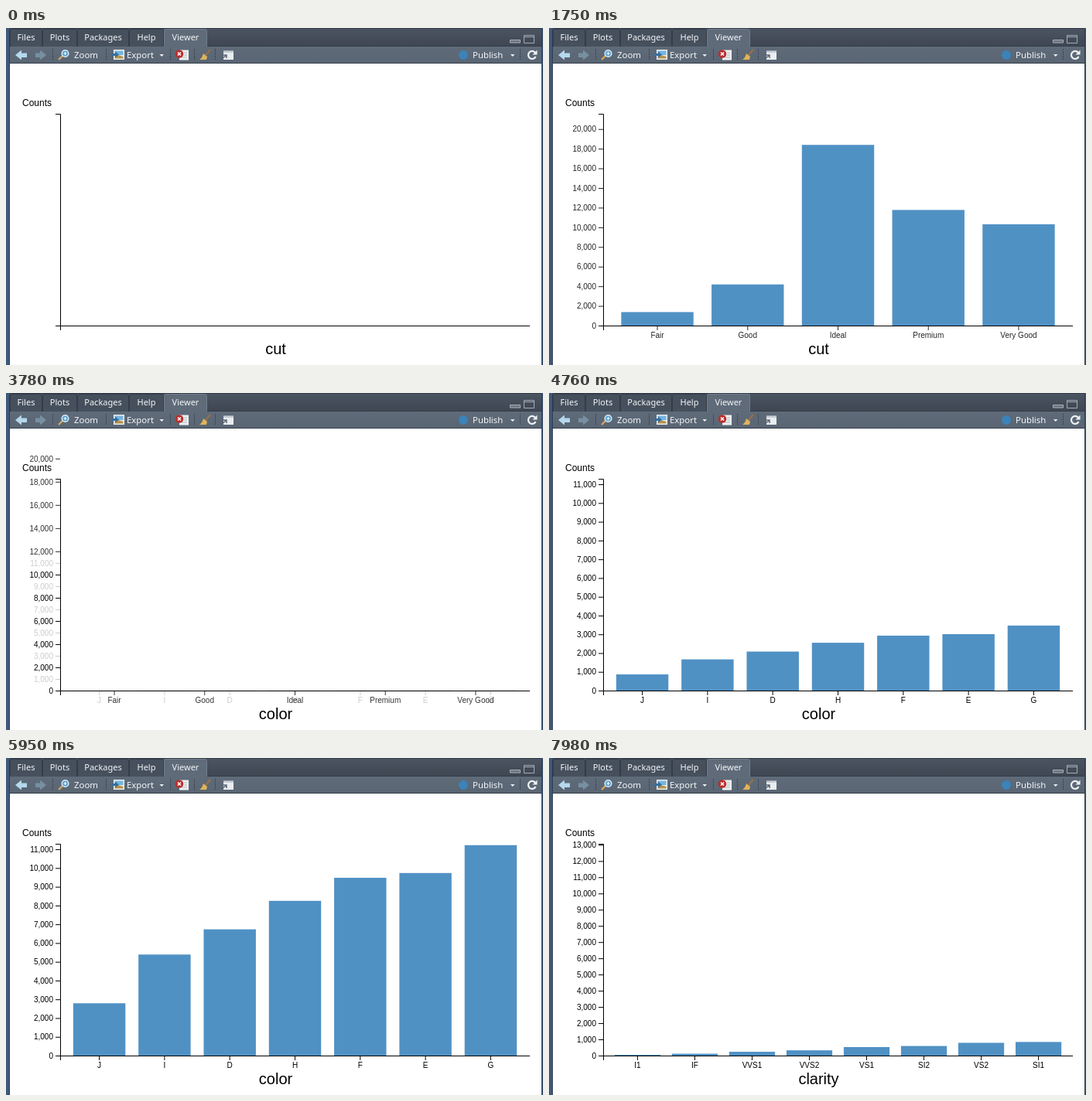
Recreate the animation shown at these times as an HTML page. Size 694x436 px, loop 8 s.

```html
<!DOCTYPE html>
<html lang="en">
<head>
<meta charset="utf-8">
<title>Bar chart viewer</title>
<style>
  html, body { margin: 0; width: 100%; height: 100%; overflow: hidden; background: #fff; }
  svg { display: block; }
  .ui { font: 11px "Noto Sans", "Open Sans", sans-serif; fill: #f4f6f8; }
  .ui .tool { font-size: 11.4px; }
  .chart { font: 10px "Liberation Sans", Arial, sans-serif; }
  .axis { fill: none; stroke: #000; }
  .bar { fill: #5091c4; }
</style>
</head>
<body>
<svg width="694" height="436" viewBox="0 0 694 436">
  <defs>
    <linearGradient id="tabBar" x2="0" y2="1">
      <stop stop-color="#4b5461"/><stop offset="1" stop-color="#3e4652"/>
    </linearGradient>
    <linearGradient id="toolBar" x2="0" y2="1">
      <stop stop-color="#5f6b79"/><stop offset="1" stop-color="#596573"/>
    </linearGradient>
  </defs>

  <!-- Window frame -->
  <rect width="694" height="436" fill="#40597a"/>
  <path d="M4.5 1V436M692.5 1V436" stroke="#2d3c4e"/>
  <rect x="5" y="46" width="687" height="390" fill="#fff"/>
  <rect x="5" y="1" width="687" height="23" fill="url(#tabBar)"/>
  <rect x="5" y="24" width="687" height="21.5" fill="url(#toolBar)"/>
  <path d="M5 .5H692M5 45.5H692" stroke="#343d49"/>
  <path d="M5 23.5H204M260 23.5H692" stroke="#353d48"/>
  <g class="ui">
    <g id="tabs"></g>
    <g class="tool">
      <text x="88" y="39">Zoom</text>
      <text x="156" y="39">Export</text>
      <text x="603" y="39">Publish</text>
    </g>
  </g>
  <path d="M60.5 27V42M129.5 27V42M212.5 27V42M243.5 27V42M270.5 27V42M664.5 27V42"
        stroke="#3b4550" stroke-dasharray="2 1"/>

  <!-- Toolbar icons -->
  <path d="M12 35L20 28.5V32.5H27V38H20V41.5Z" fill="#b5d8ed"/>
  <path d="M52 35L44 28.5V32.5H38V38H44V41.5Z" fill="#788fa1"/>
  <path d="M68 41L73 36" stroke="#d4a35e" stroke-width="2.4"/>
  <circle cx="76.5" cy="33" r="4.3" fill="#5ba2cf" stroke="#d9eaf4" stroke-width="1.5"/>
  <path d="M74.5 33H78.5M76.5 31V35" stroke="#fff"/>
  <path d="M139 28H153V41H139Z" fill="#e9eef0"/>
  <path d="M140.5 29.5H151.5V35H140.5Z" fill="#74b5df"/>
  <path d="M140.5 39.5V37L145 35L151.5 37V39.5Z" fill="#b79249"/>
  <path d="M136 33H141V30.5L146 34.5L141 38.5V36H136Z" fill="#366f9f"/>
  <path d="M198.5 34H204L201.2 37ZM652 34H657.5L654.7 37Z" fill="#edf1f4"/>
  <path d="M224 28.5H236V41.5H224Z" fill="#eef0f1"/>
  <path d="M230 32H234M230 35H234M227 38H234" stroke="#aeb6bd"/>
  <circle cx="224" cy="33.5" r="5.3" fill="#b92f2c"/>
  <path d="M222 31.5L226 35.5M226 31.5L222 35.5" stroke="#fff" stroke-width="1.6"/>
  <path d="M264 28L258 35" stroke="#9b7048" stroke-width="2"/>
  <path d="M255 33L260 37L259 41H250Q254 38 255 33Z" fill="#dfb45b"/>
  <path d="M281 29.5H294V41H281Z" fill="#e9edf0"/>
  <path d="M281 31H294" stroke="#a4afb9"/>
  <path d="M279 40L284 36M281 35H285V39" fill="none" stroke="#596573" stroke-width="1.5"/>
  <circle cx="591" cy="35" r="6" fill="#3b83b9"/>
  <path d="M684 32A5 5 0 1 0 684.5 37" fill="none" stroke="#eef1f3" stroke-width="2.2"/>
  <path d="M686.5 28.5V34.5H680.5Z" fill="#eef1f3"/>
  <path d="M651.5 15.5H664.5V19H651.5Z" fill="#69737f" stroke="#aab1b9"/>
  <path d="M669.5 9.5H682.5V19.5H669.5ZM669.5 11.5H682.5" fill="none" stroke="#a3abb4"/>

  <g class="chart">
    <text x="21" y="101" font-size="12">Counts</text>
    <g id="plot"></g>
    <path class="axis" d="M64 111.5H70.5V385.5H64M70.5 391V385.5H677"/>
    <text id="title" x="348.5" y="422" font-size="20" text-anchor="middle"></text>
  </g>
</svg>
<script>
const LOOP = 8000, BAR_TIME = 2600;
const LEFT = 70, BASE = 385, WIDTH = 607, HEIGHT = 274;

const charts = [
  { title: 'cut', start: 15, axisTime: BAR_TIME, tickStep: 2000,
    data: { Fair: 1610, Good: 4906, Ideal: 21551, Premium: 13791, 'Very Good': 12082 } },
  { title: 'color', start: 3656, axisTime: 340, tickStep: 1000,
    data: { J: 2808, I: 5422, D: 6775, H: 8304, F: 9542, E: 9797, G: 11292 } },
  { title: 'clarity', start: 7325, axisTime: 340, tickStep: 1000,
    data: { I1: 741, IF: 1790, VVS1: 3655, VVS2: 5066, VS1: 8171, SI2: 9194, VS2: 12258, SI1: 13065 } }
];

for (const chart of charts) {
  const entries = Object.entries(chart.data);
  const step = WIDTH / (entries.length + 0.2);
  chart.max = Math.max(...Object.values(chart.data));
  chart.band = step * 0.8;
  chart.bars = entries.map(([label, value], i) => ({ label, value, x: LEFT + step * (i + 0.2) }));
  chart.ticks = [];
  for (let v = 0; v <= chart.max; v += chart.tickStep) chart.ticks.push(v);
}

const plot = document.getElementById('plot');
const title = document.getElementById('title');

document.getElementById('tabs').innerHTML =
  [['Files', 6, 40], ['Plots', 48, 43], ['Packages', 93, 65], ['Help', 160, 43], ['Viewer', 205, 54]]
    .map(([name, x, width]) => {
      const active = name === 'Viewer';
      return `<path d="M${x - .5} 24V3.5Q${x - .5} 1.5 ${x + 2} 1.5H${x + width - 2}Q${x + width + .5} 1.5 ${x + width + .5} 3.5V24"
        fill="${active ? '#5f6b79' : '#46505d'}" stroke="${active ? '#717d8a' : '#343c47'}"/>
        <text x="${x + width / 2}" y="16" text-anchor="middle">${name}</text>`;
    }).join('');

function ease(t) {
  t = Math.min(1, Math.max(0, t));
  return t < 0.5 ? 4 * t ** 3 : 1 - 4 * (1 - t) ** 3;
}

const valueY = (value, max) => BASE - HEIGHT * value / max;

function yTick(value, y, opacity) {
  return `<g opacity="${opacity}" transform="translate(0 ${y + 0.5})">
    <path class="axis" d="M64 0H70"/>
    <text x="61" y="3.2" text-anchor="end">${value.toLocaleString('en-US')}</text></g>`;
}

function xTicks(chart, opacity) {
  return `<g opacity="${opacity}">` + chart.bars.map(({ label, x }) => {
    const middle = x + chart.band / 2;
    return `<path class="axis" d="M${middle} 385V391"/>
      <text x="${middle}" y="401" text-anchor="middle">${label}</text>`;
  }).join('') + '</g>';
}

function render(time) {
  const index = Math.max(0, charts.findLastIndex(chart => time >= chart.start));
  const chart = charts[index], previous = charts[index - 1];
  const grow = ease((time - chart.start) / BAR_TIME);
  const fade = ease((time - chart.start) / chart.axisTime);
  const oldTicks = previous ? previous.ticks : [];
  const oldMax = previous ? previous.max : chart.max;

  let markup = chart.bars.map(({ value, x }) => {
    const height = HEIGHT * value / chart.max * grow;
    return `<rect class="bar" x="${x}" y="${BASE - height}" width="${chart.band}" height="${height}"/>`;
  }).join('');

  // Ticks slide from the old scale to the new one while entering or leaving.
  for (const value of new Set([...oldTicks, ...chart.ticks])) {
    const entering = !oldTicks.includes(value), leaving = !chart.ticks.includes(value);
    const from = valueY(value, oldMax), to = valueY(value, chart.max);
    const opacity = entering ? fade : leaving ? 1 - fade : 1;
    if (opacity > 0) markup += yTick(value, from + (to - from) * fade, opacity);
  }
  if (previous && fade < 1) markup += xTicks(previous, 1 - fade);
  markup += xTicks(chart, fade);

  plot.innerHTML = markup;
  title.textContent = chart.title;
}

const origin = performance.now();
function frame() {
  render((performance.now() - origin) % LOOP);
  requestAnimationFrame(frame);
}
frame();
</script>
</body>
</html>
```
